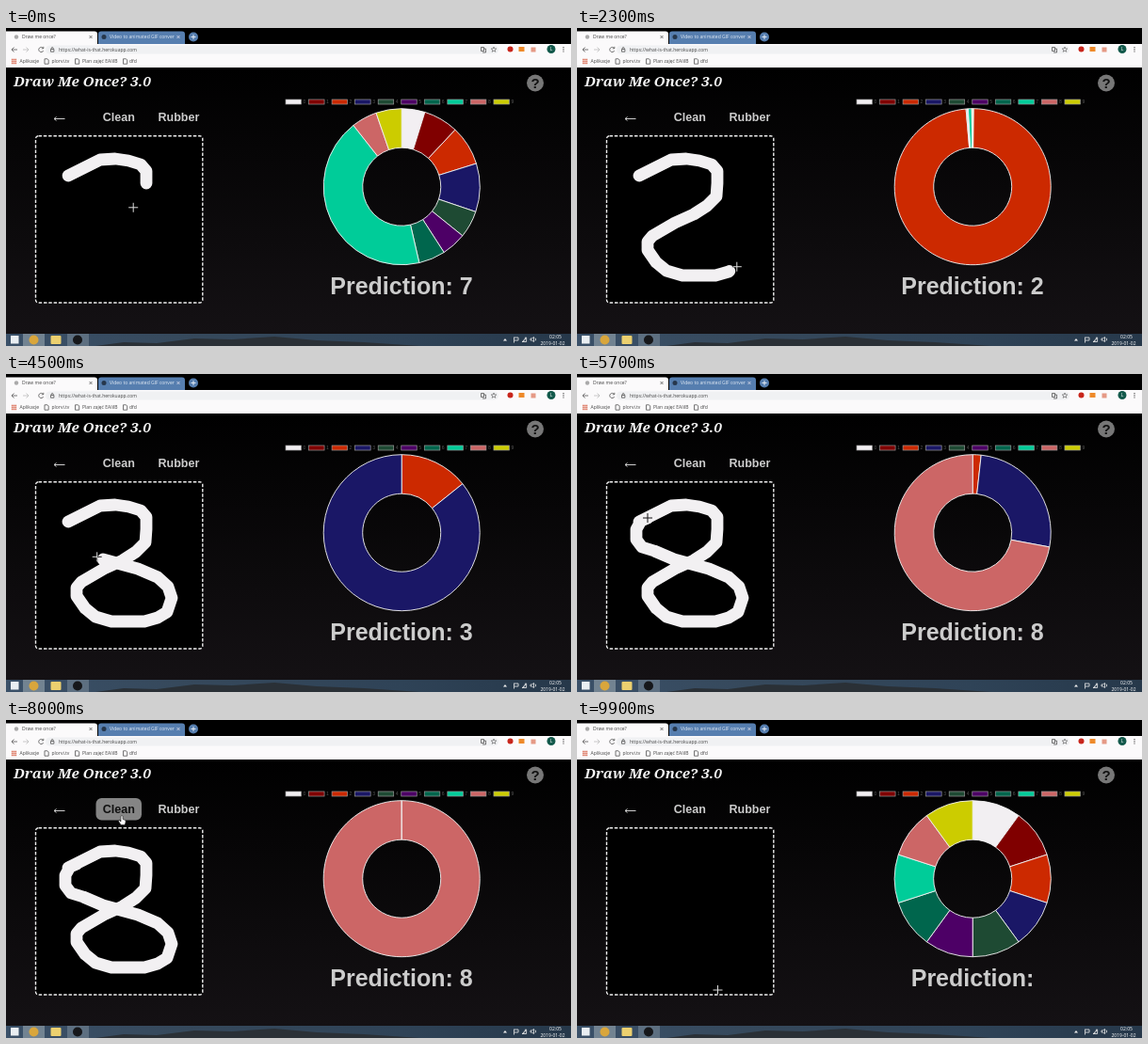
These frames come from a looping animation (600x338 px, 10 s). An HTML page:

```html
<!DOCTYPE html>
<html lang="en">
<head>
<meta charset="utf-8">
<title>Draw me once?</title>
<style>
  html, body { margin: 0; width: 100%; height: 100%; overflow: hidden; background: #000; }
  svg { display: block; width: 100%; height: 100%; }
  text { font-family: "Liberation Sans", Arial, sans-serif; }
  .ui text { font-family: "Open Sans", "Noto Sans", sans-serif; font-size: 5px; fill: #444; }
  .bold { font-weight: bold; fill: #ccc; }
  .line { fill: none; stroke: #555; stroke-width: .8; }
</style>
</head>
<body>
<svg viewBox="0 0 600 338" preserveAspectRatio="none">
  <defs>
    <linearGradient id="page" x2="0" y2="1">
      <stop offset="0" stop-color="#000"/><stop offset="1" stop-color="#141114"/>
    </linearGradient>
    <linearGradient id="sea">
      <stop offset="0" stop-color="#3a5068"/><stop offset=".3" stop-color="#36495c"/>
      <stop offset=".7" stop-color="#2f4357"/><stop offset="1" stop-color="#26384a"/>
    </linearGradient>
    <path id="doc" class="line" d="M0 0h3l1.200 1.200v4.200H0z"/>
  </defs>

  <g class="ui">
    <rect width="600" height="18" fill="#000"/>
    <path d="M0 17V3.500H94Q97 3.500 97 6.500V17Z" fill="#fbfafb"/>
    <path d="M98 17V6.500Q98 3.500 101 3.500H187Q190 3.500 190 6.500V17Z" fill="#567eaf"/>
    <circle cx="11" cy="9.500" r="2.200" fill="#aaa"/>
    <text x="17" y="11.300">Draw me once?</text>
    <path class="line" d="M88.500 8l3 3m0-3l-3 3"/>
    <circle cx="104" cy="9.500" r="2.500" fill="#26374c"/>
    <text x="110" y="11.300" style="fill:#e4ecf5">Video to animated GIF conver</text>
    <path class="line" style="stroke:#dde" d="M181.500 8l3 3m0-3l-3 3"/>
    <circle cx="199" cy="9.500" r="5" fill="#567eaf"/>
    <path class="line" style="stroke:#fff" d="M196.500 9.500h5m-2.500-2.500v5"/>

    <rect y="17" width="600" height="25" fill="#fbfafb"/>
    <rect x="42" y="18.500" width="481" height="9" rx="4.500" fill="#f0f1f3"/>
    <path class="line" d="M12 23H6m2.500-2.500L6 23l2.500 2.500"/>
    <path class="line" style="stroke:#bbb" d="M18 23h6m-2.500-2.500L24 23l-2.500 2.500"/>
    <path class="line" d="M40.500 21.500a2.600 2.600 0 1 0 .2 2.600M40.800 19.800v2h-2" transform="translate(-1 0)"/>
    <path class="line" d="M47.500 22.500h3.400v2.700h-3.400zM48.200 22.500v-1a1 1 0 0 1 2 0v1"/>
    <text x="56" y="24.800">https://what-is-that.herokuapp.com</text>
    <path class="line" d="M504.500 20.500h3v4h-3zM507 22h2.500v4H506"/>
    <path class="line" d="M518 20l.8 2h2l-1.600 1.300.6 2-1.800-1.200-1.800 1.200.6-2-1.600-1.300h2z" style="stroke-width:.6"/>
    <circle cx="535.500" cy="22.500" r="3" fill="#c8251b"/>
    <rect x="544.500" y="20" width="6" height="5" fill="#ee8a2a"/>
    <rect x="557.500" y="20.500" width="5" height="5" fill="#e59a86"/>
    <circle cx="579" cy="22.500" r="4.500" fill="#12594b"/>
    <text x="577.700" y="24.300" style="fill:#fff">L</text>
    <path d="M592 20v5.600" stroke="#555" stroke-width="1.200" stroke-dasharray="1.200 1"/>

    <path d="M6 33.500h5M6 35.500h5M6 37.500h5" stroke="#d75f45" stroke-width="1.300" stroke-dasharray="1.300 .6"/>
    <text x="14.500" y="37.200">Aplikacje</text>
    <use href="#doc" x="41" y="32.800"/>
    <text x="48.500" y="37.200">plorvi.tv</text>
    <use href="#doc" x="73.500" y="32.800"/>
    <text x="81" y="37.200">Plan zajęć EAIiIB</text>
    <use href="#doc" x="124.500" y="32.800"/>
    <text x="131" y="37.200">dfd</text>
  </g>

  <rect y="42" width="600" height="283" fill="url(#page)"/>
  <text x="8" y="62" style="font:italic bold 15.200px 'Noto Serif','Liberation Serif',serif" fill="#f4f4f4">Draw Me Once? 3.0</text>
  <circle cx="562" cy="58.500" r="9" fill="#777"/>
  <text x="562" y="64" text-anchor="middle" font-size="15" font-weight="bold" fill="#111">?</text>

  <path d="M62.500 96.500H51m2.500-2L51 96.500l2.500 2" fill="none" stroke="#ccc" stroke-width="1"/>
  <rect id="hover" x="95.500" y="83" width="48.500" height="23.500" rx="6" fill="#858585"/>
  <text id="clean" class="bold" x="102.800" y="99" font-size="12.500">Clean</text>
  <text class="bold" x="161.500" y="99" font-size="12.500">Rubber</text>

  <rect x="31.500" y="114.700" width="177.300" height="177.300" rx="3" fill="#000" stroke="#eee" stroke-width="1.400" stroke-dasharray="3.500 1.800"/>
  <polyline id="ink" fill="none" stroke="#f2f0f2" stroke-width="12.800" stroke-linecap="round" stroke-linejoin="round"/>

  <g id="legend"></g>
  <g id="chart" stroke="#f4f4f4" stroke-width=".9" stroke-linejoin="bevel"></g>
  <text id="prediction" class="bold" x="420" y="283" text-anchor="middle" font-size="25"></text>

  <g class="ui">
    <rect y="325" width="600" height="13" fill="url(#sea)"/>
    <path d="M95 338l30-4 35 1 40-5 40 1 45-3 45 4 50 2 60 4z" fill="#2a3036"/>
    <rect x="18" y="325" width="23" height="13" fill="#8b9aa4" opacity=".7"/>
    <rect x="65" y="325" width="23" height="13" fill="#8b9aa4" opacity=".45"/>
    <rect x="5" y="327" width="8.500" height="8.500" fill="#e9eef2"/>
    <circle cx="29.500" cy="331.500" r="5" fill="#d9a63c"/>
    <rect x="47.500" y="327" width="11" height="9" rx="1" fill="#ecd06f"/>
    <circle cx="76" cy="331.500" r="5" fill="#16171a"/>
    <path d="M528 332.500l2-2.500 2 2.500z" fill="#eee"/>
    <path d="M539.500 328.500v6M540 329h4v3h-4M548 333.500h1v-1h1.200v-1.500h1.200v-2h1.200v4.500zM557 330h1.500l2-1.500v5l-2-1.500H557zM562 329.500q1.500 1.500 0 3" fill="none" stroke="#eee" stroke-width=".8"/>
    <text x="583.500" y="329.800" text-anchor="middle" style="fill:#fff">02:05</text>
    <text x="580.500" y="336.700" text-anchor="middle" style="fill:#fff">2019-01-02</text>
  </g>

  <path id="cross" d="M-5 0H5M0-5V5" stroke="#ddd" stroke-width="1" style="mix-blend-mode:difference"/>
  <path id="hand" d="M-1 0Q0-1 1 0V3.500L4 4.500V7L3 9.500H-1L-3.500 5.500-2.500 4.700-1 6Z" fill="#fff" stroke="#222" stroke-width=".6"/>
</svg>
<script>
const LOOP = 10000, STEP = 100, TAU = Math.PI * 2;
const CLEAR_AT = 8200;
const COLORS = ['#f2eff2', '#800000', '#cc2900', '#1a1766', '#1e4a33',
                '#4d0066', '#00664d', '#00cc99', '#cc6666', '#cccc00'];
const $ = id => document.getElementById(id);

// The drawn digit; positions along it are fractional point indices.
const digit = [[66,157],[100,140],[116,139],[130,141],[143,145],[149,152],[149,165],[148,179],
  [138,189],[124,198],[104,207],[80,221],[75,227],[75,236],[84,249],[95,258],[112,263],[147,263],
  [161,259],[171,253],[176,238],[172,226],[161,216],[140,207],[103,197],[82,188],[69,184],
  [63,176],[63,165],[68,156],[75,153]];
const penKeys = [[0,6],[1200,18],[2600,18.1],[3500,22],[4500,24],[5700,30]];
const leadKeys = [[0,8.2],[1200,18.8],[2600,18.9],[3500,22.3],[4500,24.3],[5700,30]];
const mouseX = [[6400,75],[7300,123],[8500,123],[9400,149.5]];
const mouseY = [[6400,153],[7300,102],[8500,102],[9400,287]];

const lerp = (a, b, k) => a + (b - a) * k;
const smooth = k => k * k * (3 - 2 * k);

function keyed(keys, t, ease = k => k) {
  if (t <= keys[0][0]) return keys[0][1];
  for (let i = 1; i < keys.length; i++) {
    const [t0, a] = keys[i - 1], [t1, b] = keys[i];
    if (t < t1) return lerp(a, b, ease((t - t0) / (t1 - t0)));
  }
  return keys[keys.length - 1][1];
}

function along(u) {
  const i = Math.min(Math.floor(u), digit.length - 2);
  return [0, 1].map(axis => lerp(digit[i][axis], digit[i + 1][axis], u - i));
}

const opening = [.048, .072, .082, .1, .056, .051, .055, .43, .053, .053];
const only = n => COLORS.map((_, i) => +(i === n));
const settle = ms => 1 - Math.max(0, (Math.exp(-ms / 600) - .01) / .99);
const outQuart = ms => 1 - (1 - Math.min(1, ms / 1000)) ** 4;
const targets = [
  { from: 130, shares: only(2), ease: settle },
  { from: 3365, shares: only(3), ease: settle },
  { from: 4950, shares: only(8), ease: settle },
  { from: CLEAR_AT, shares: COLORS.map(() => .1), ease: outQuart }
];

function sharesAt(t) {
  let shares = opening;
  targets.forEach((target, i) => {
    if (t < target.from) return;
    const end = i + 1 < targets.length ? Math.min(t, targets[i + 1].from) : t;
    const k = target.ease(end - target.from);
    shares = shares.map((s, n) => lerp(s, target.shares[n], k));
  });
  return shares;
}

function guessAt(t) {
  const labels = [' 2', ' 3', ' 8', ''];
  return labels[targets.filter(target => t >= target.from).length - 1] ?? ' 7';
}

function add(parent, name, attrs) {
  const el = document.createElementNS('http://www.w3.org/2000/svg', name);
  for (const key in attrs) el.setAttribute(key, attrs[key]);
  return parent.appendChild(el);
}

const slices = COLORS.map((fill, i) => {
  const x = 297 + 24.55 * i;
  add($('legend'), 'rect', { x, y: 76, width: 16.5, height: 5, fill, stroke: '#999', 'stroke-width': .7 });
  add($('legend'), 'text', { x: x + 18.5, y: 80.3, 'font-size': 5, fill: '#555' }).textContent = i;
  return add($('chart'), 'path', { fill });
});

function slicePath(from, share) {
  if (share < 1e-4) return '';
  const a = from * TAU, b = a + Math.min(share * TAU, TAU - 1e-3);
  const at = (r, angle) => `${420.2 + r * Math.sin(angle)} ${168.7 - r * Math.cos(angle)}`;
  const large = +(b - a > Math.PI);
  return `M${at(83, a)}A83 83 0 ${large} 1 ${at(83, b)}L${at(41.5, b)}A41.5 41.5 0 ${large} 0 ${at(41.5, a)}Z`;
}

function show(el, visible) {
  el.style.display = visible ? '' : 'none';
}

function render(t) {
  const pen = keyed(penKeys, t);
  $('ink').setAttribute('points', [...digit.slice(0, Math.floor(pen) + 1), along(pen)].join(' '));
  show($('ink'), t < CLEAR_AT);

  let start = 0;
  sharesAt(t).forEach((share, i) => {
    slices[i].setAttribute('d', slicePath(start, share));
    start += share;
  });
  $('prediction').textContent = 'Prediction:' + guessAt(t);

  const [x, y] = t <= 5700 ? along(keyed(leadKeys, t))
                           : [keyed(mouseX, t, smooth), keyed(mouseY, t, smooth)];
  const hovering = x > 95 && x < 144 && y < 106.5;
  show($('hover'), hovering);
  $('clean').style.fill = hovering ? '#111' : '';
  show($('hand'), hovering);
  show($('cross'), !hovering);
  $(hovering ? 'hand' : 'cross').setAttribute('transform', `translate(${x} ${y})`);
}

const begin = performance.now();
function tick() {
  const t = (performance.now() - begin) % LOOP;
  render(Math.floor(t / STEP) * STEP);
  requestAnimationFrame(tick);
}
tick();
</script>
</body>
</html>
```
